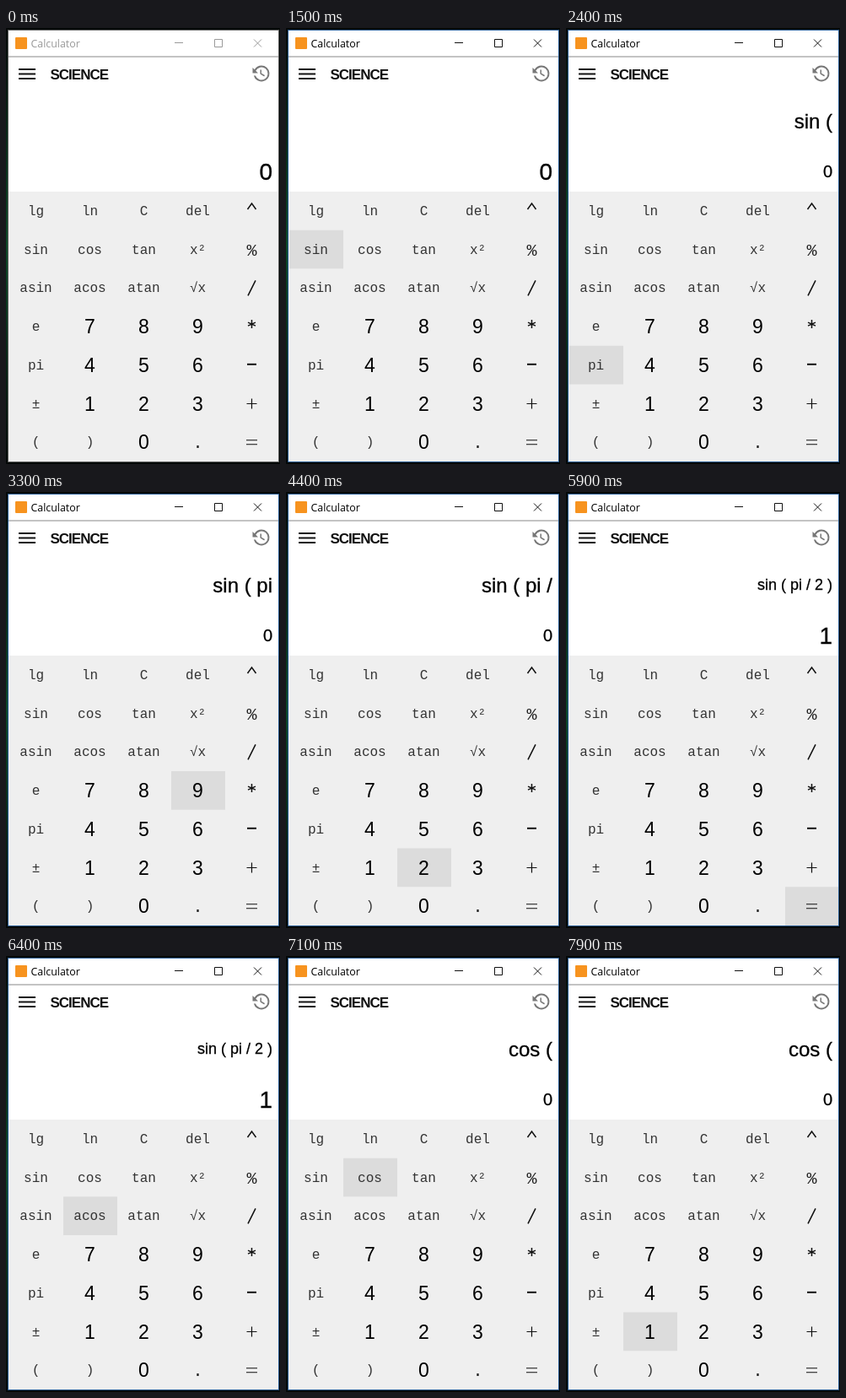
These frames come from a looping animation (325 px wide and 517 px high, 8 s). An HTML page:

```html
<!DOCTYPE html>
<html lang="en">
<head>
<meta charset="utf-8">
<title>Calculator</title>
<style>
  html, body { margin: 0; width: 100%; height: 100%; overflow: hidden; background: #040807; }
  svg { display: block; width: 325px; height: 517px; }
  text { font-family: "Liberation Sans", Arial, sans-serif; fill: #000; white-space: pre; }
  .key { font-size: 16px; font-family: "Liberation Mono", "Courier New", monospace; fill: #333; text-anchor: middle; }
  .op { font-size: 20px; fill: #222; }
  .num { font-size: 23px; font-family: "Liberation Sans", Arial, sans-serif; fill: #000; }
  .out { text-anchor: end; stroke: #000; stroke-width: .3px; }
  .line { fill: none; stroke: #111; }
  #title { font: 12.4px "Open Sans", "Noto Sans", sans-serif; }
  #name { font: 700 17px "Liberation Sans", Arial, sans-serif; letter-spacing: -1px; fill: #111; }
</style>
</head>
<body>
<svg viewBox="0 0 325 517">
  <defs>
    <linearGradient id="edge" x2="0" y2="1">
      <stop offset="0" stop-color="#040807"/>
      <stop offset=".5" stop-color="#0c4a28"/>
      <stop offset="1" stop-color="#040807"/>
    </linearGradient>
  </defs>
  <rect width="2" height="517" fill="url(#edge)"/>
  <rect id="frame" x="2.5" y="2.5" width="321" height="512" fill="#fff"/>
  <rect x="3" y="194" width="320" height="320" fill="#efefef"/>
  <path d="M3 34H323" stroke="#888"/>
  <rect x="11" y="11" width="14" height="14" rx="1" fill="#f7931e"/>
  <text id="title" x="29.500" y="22.500">Calculator</text>
  <path id="buttons" d="M200 17.500h10M247.500 13.500h9v9h-9zM294 13.500l9 9m0-9l-9 9" fill="none"/>
  <path d="M15 49h20M15 54.500h20M15 60h20" stroke="#111" stroke-width="2.200"/>
  <text id="name" x="52.500" y="61">SCIENCE</text>
  <path transform="translate(290.500 42.500)" fill="#777" d="M11 7v5.100l4.700 2.800.8-1.300-4-2.400V7zM12.500 2A9.500 9.500 0 0 0 4.270 6.770L2 4.500V11H8.500L5.750 8.250A7.500 7.500 0 1 1 5.440 14H3.340A9.500 9.500 0 1 0 12.500 2z"/>
  <rect id="hover" width="64" height="45.700" fill="#dcdcdc"/>
  <g id="keys"></g>
  <text id="expr" class="out" x="316"></text>
  <text id="result" class="out" x="316"></text>
</svg>
<script>
const $ = id => document.getElementById(id);
const LOOP = 8000, COL = 64, ROW = 45.7;
const rows = [
  'lg ln C del ^', 'sin cos tan x² %', 'asin acos atan √x /',
  'e 7 8 9 *', 'pi 4 5 6 -', '± 1 2 3 +', '( ) 0 . ='
].map(r => r.split(' '));

const add = (tag, attrs, text = '') => {
  const el = document.createElementNS('http://www.w3.org/2000/svg', tag);
  for (const k in attrs) el.setAttribute(k, attrs[k]);
  el.textContent = text;
  $('keys').append(el);
};

// Operators drawn as strokes around the key centre
const strokes = {
  '+': ['h12m-6-6v12', -6, 0, 1.2],
  '=': ['h13m0 5h-13', -6.5, -2.5, 1.1],
  '-': ['h11', -5.5, -1, 2],
  '/': ['l9-18', -4.5, 9, 1.5],
  '^': ['l5-7l5 7', -5, -2, 1.5],
  '*': ['v10m-4.5-7l9 4m0-4l-9 4', 0, -8, 1.5]
};

const spot = {};
rows.forEach((row, r) => row.forEach((k, c) => {
  const x = 4 + c * COL, y = 194 + r * ROW;
  const cx = x + 31.5, cy = y + 23;
  spot[k] = { x, y };
  if (strokes[k]) {
    const [d, dx, dy, w] = strokes[k];
    add('path', { class: 'line', 'stroke-width': w, d: `M${cx + dx} ${cy + dy}${d}` });
  } else if (/\d/.test(k)) {
    add('text', { class: 'key num', x: cx, y: cy + 8 }, k);
  } else if (/[%.]/.test(k)) {
    add('text', { class: 'key op', x: cx, y: cy + 7 }, k);
  } else {
    add('text', { class: 'key', x: cx, y: cy + 5 }, k);
  }
}));

// [time, key under the pointer]
const path = [
  [0, ''], [800, 'del'], [900, 'tan'], [1000, 'cos'], [1100, 'sin'],
  [2000, 'asin'], [2100, 'e'], [2200, 'pi'], [3100, '4'], [3200, '8'],
  [3300, '9'], [3500, '/'], [4100, '6'], [4200, '5'], [4300, '2'],
  [4800, ')'], [5200, '0'], [5300, '.'], [5400, '='], [6100, '3'],
  [6200, '5'], [6300, '7'], [6400, 'acos'], [6500, 'cos'],
  [7200, 'acos'], [7300, '7'], [7500, '4'], [7700, '1']
];
// [time, expression, result, solved]
const display = [
  [0, '', '0', true], [1700, 'sin (', '0'], [2600, 'sin ( pi', '0'],
  [3800, 'sin ( pi /', '0'], [4600, 'sin ( pi / 2', '0'],
  [5000, 'sin ( pi / 2 )', '0'], [5800, 'sin ( pi / 2 )', '1', true],
  [6800, 'cos (', '0']
];
const at = (list, t) => list.findLast(e => e[0] <= t);

const set = (id, text, size, y) => {
  const el = $(id);
  el.textContent = text;
  el.setAttribute('font-size', size);
  el.setAttribute('y', y);
};

function draw(now) {
  const t = now % LOOP;
  const active = t >= 1500;
  $('title').style.fill = active ? '#000' : '#999';
  $('buttons').setAttribute('stroke', active ? '#111' : '#999');
  $('frame').setAttribute('stroke', active ? '#2c5f96' : '#666');

  const key = spot[at(path, t)[1]];
  $('hover').setAttribute('visibility', key ? 'visible' : 'hidden');
  if (key) {
    $('hover').setAttribute('x', key.x);
    $('hover').setAttribute('y', key.y);
    // The last column is cut off by the window border
    $('hover').setAttribute('width', Math.min(COL, 323 - key.x));
  }

  const [, expr, result, solved] = at(display, t);
  set('expr', expr, solved ? 18 : 24, solved ? 116 : 119);
  set('result', result, solved ? 28 : 20, solved ? 180 : 177);
}

const start = performance.now();
(function tick() {
  draw(performance.now() - start);
  requestAnimationFrame(tick);
})();
</script>
</body>
</html>
```
